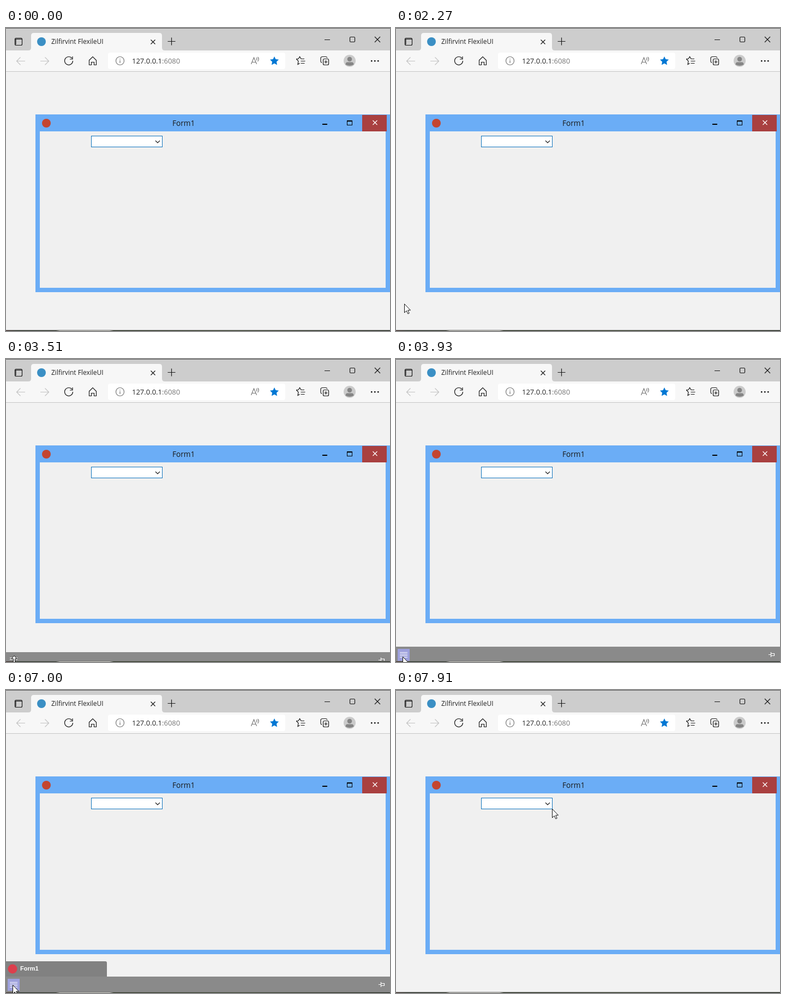
An HTML page that plays this animation: 704x554 px, repeating every 7990 ms.

```html
<!DOCTYPE html>
<html lang="en">
<head>
<meta charset="utf-8">
<title>Form list</title>
<style>
  html, body { margin: 0; width: 100%; height: 100%; overflow: hidden; background: #f2f2f2; }
  svg { display: block; width: 704px; height: 554px; font-family: "Open Sans", "Noto Sans", sans-serif; }
  .line { fill: none; stroke: #1a1a1a; stroke-width: 1.2; }
  .dim { stroke: #c3c3c3; }
  .grey { stroke: #777; }
  .white { stroke: #fff; }
</style>
</head>
<body>
<svg viewBox="0 0 704 554">
  <defs>
    <linearGradient id="desktop">
      <stop offset="0" stop-color="#4a302c"/>
      <stop offset=".03" stop-color="#253022"/>
      <stop offset=".13" stop-color="#30382b"/>
      <stop offset=".14" stop-color="#c4c4bc"/>
      <stop offset=".27" stop-color="#d0d0c8"/>
      <stop offset=".28" stop-color="#29331f"/>
      <stop offset=".6" stop-color="#3c4630"/>
      <stop offset="1" stop-color="#20281b"/>
    </linearGradient>
    <clipPath id="page"><path d="M0 80H704V552H0Z"/></clipPath>
  </defs>

  <!-- Browser title bar -->
  <path fill="#f2f2f2" d="M0 0H704V554H0Z"/>
  <path fill="#cdcdcd" d="M0 0H704V41H0Z"/>
  <path fill="#5c5c5c" d="M0 0H704V1H0Z"/>
  <path fill="#f7f7f7" d="M0 41H41Q46 41 46 36V14Q46 9 51 9H281Q286 9 286 14V36Q286 41 291 41H704V79H0Z"/>
  <path fill="#c6c6c6" d="M0 79H704V80H0Z"/>
  <rect class="line" x="16.5" y="18.5" width="13" height="13" rx="2"/>
  <path class="line" stroke-width="2.5" d="M17 20.3H29M18 20V30"/>
  <circle cx="65" cy="25" r="8" fill="#3b8fc4"/>
  <text x="83" y="29" font-size="12" fill="#222">Zilfirvint FlexileUI</text>
  <path class="line" stroke-width="1.5" d="M265.500 21.500l8 8m0-8l-8 8"/>
  <path class="line" d="M296.500 24.500h14m-7-7v14"/>
  <path class="line" d="M584 21.500h10M676 16l10 10m0-10l-10 10"/>
  <rect class="line" x="630.5" y="16.500" width="9" height="9" rx="1.5"/>

  <!-- Browser toolbar -->
  <path class="line dim" d="M35 60.500H19.500m7-7l-7 7 7 7M63 60.500H78.500m-7-7l7 7-7 7"/>
  <path class="line" stroke-width="1.4" d="M121 55.500A7.500 7.500 0 1 0 122.500 60M122 52v5h-5"/>
  <path class="line" d="M152.500 59L159 52.500 165.500 59V67.500H161.500V62.500H156.500V67.500H152.500Z"/>
  <rect x="187" y="45" width="325" height="30" rx="4" fill="#fff"/>
  <circle class="line grey" cx="209" cy="60" r="7.500"/>
  <path class="line grey" d="M209 59v5M209 56v1.500"/>
  <text x="231" y="65" font-size="13" fill="#222">127.0.0.1<tspan fill="#767676">:6080</tspan></text>
  <path class="line grey" d="M449.500 66L454.500 54 459.500 66M451 62.500h7M459 54q2 3 0 5M461.500 53q3.500 4 0 8"/>
  <path id="star" fill="#0078d4"/>
  <path class="line" d="M532 56.500h4l2.500-4 2.500 4h6M532.500 57l3.500 3.500-1 6 3.500-2M540.500 60.500h8M540.500 64.500h7"/>
  <path class="line" d="M579 63.500q-2-1-2-3v-5q0-3 3-3h6q2 0 3 2"/>
  <rect class="line" x="581.500" y="56.500" width="10" height="11" rx="2"/>
  <path class="line" d="M583.500 62h6m-3-3v6"/>
  <circle cx="630" cy="60" r="11" fill="#cbcbcb"/>
  <circle cx="630" cy="57" r="4.300" fill="#858585"/>
  <path fill="#858585" d="M622.500 67Q622.500 62.500 626 62.500H634Q637.500 62.500 637.500 67Q630 71 622.500 67Z"/>
  <path fill="#1a1a1a" d="M669 59h2.500v2.500H669ZM675 59h2.500v2.500H675ZM681 59h2.500v2.500H681Z"/>

  <!-- Application window -->
  <path fill="#6badf6" d="M54 158H704V483H54Z"/>
  <path fill="#f0f0f0" d="M62 189H696V475H62Z"/>
  <circle cx="74" cy="174" r="8" fill="#c4452f"/>
  <text x="305" y="179" font-size="13.6" fill="#1a1a1a">Form1</text>
  <path fill="#000" d="M580 175H589V177H580Z"/>
  <path fill="#000" fill-rule="evenodd" d="M625 169H635V178H625ZM626 171V177H634V171Z"/>
  <path fill="#a94040" d="M653 159H698V189H653Z"/>
  <path class="line white" stroke-width="1.6" d="M672.500 169l8 8m0-8l-8 8"/>
  <rect x="156.500" y="197.500" width="130" height="20" fill="#fff" stroke="#0f74bd"/>
  <path class="line" stroke-width="1" d="M274 206l4 4 4-4"/>

  <g id="note">
    <text x="112" y="423.500" font-size="23.7" fill="#f01c1f">The form list only has 1 item in it for the main form.</text>
    <path fill="none" stroke="#f5181b" stroke-width="3" stroke-linejoin="round"
      d="M52 494L61 464 69 469 102 431 107 436 75 471 82 478ZM73 461L68 478 88 456"/>
  </g>

  <g id="list">
    <path fill="#818181" d="M0 496H182Q185 496 185 499V524H0Z"/>
    <circle cx="12" cy="510" r="8.500" fill="#dc3f4d"/>
    <text x="26" y="513" font-size="11" font-weight="bold" fill="#fff" font-family="Liberation Sans, Arial, sans-serif">Form1</text>
  </g>

  <g clip-path="url(#page)">
    <g id="bar">
      <path fill="#8a8a8a" d="M0 0H704V28H0Z"/>
      <rect id="glow" x="3" y="4" width="22" height="22" fill="#9da0dc"/>
      <path class="line white" stroke-width="1" d="M7 10.500h14M7 13.500h14M7 16.500h14M7 19.500h14"/>
      <path class="line white" d="M683 14.500h4M687.500 10v9M688 12.500h5.500v4H688"/>
    </g>
  </g>

  <path fill="#777" d="M0 552H704V553H0Z"/>
  <path fill="url(#desktop)" d="M0 553H704V554H0Z"/>

  <g fill="#fff" stroke="#111" stroke-linejoin="round">
    <path id="arrow" d="M.5 .5V16.500L4.200 13 6.800 18.500 9.200 17.500 6.700 12H11.500Z"/>
    <path id="resize" d="M0-11.500L5-6H1.500V6H5L0 11.500-5 6H-1.500V-6H-5Z"/>
  </g>
</svg>

<script>
const LOOP = 7990;
const BAR_TOP = 524, BAR_HEIGHT = 28;
const el = id => document.getElementById(id);
const clamp = v => Math.min(1, Math.max(0, v));
const show = (id, on) => el(id).style.display = on ? "" : "none";
const place = (id, x, y) => el(id).setAttribute("transform", `translate(${x} ${y})`);

// Cursor moves: start time, shape, from x, y, then optionally to x, y, end time
const moves = [
  [650, "arrow", 643, 432, 10, 543, 1370],
  [1450, "arrow", 14, 541],
  [1530, "resize", 17, 553],
  [1700, "resize", 16, 545, 12, 516, 1940],
  [2270, "arrow", 15, 504],
  [2520, "arrow", 15, 506, 12, 540, 3190],
  [3270, "resize", 15, 554],
  [3690, "arrow", 12, 548, 12, 544, 3930],
  [4260, "arrow", 12, 539],
  [7090, "arrow", 14, 532, 20, 515, 7170],
  [7420, "arrow", 40, 490, 286, 217, 7910]
];

// Progress in equal jumps of about 80 ms
function stepped(t, start, end) {
  const count = Math.round((end - start) / 80);
  return clamp(Math.floor((t - start) / (end - start) * count + 1e-6) / count);
}

function drawCursor(t) {
  const move = moves.findLast(m => m[0] <= t);
  show("arrow", move && move[1] === "arrow");
  show("resize", move && move[1] === "resize");
  if (!move) return;
  const [start, shape, x, y, toX = x, toY = y, end = start + 80] = move;
  const p = Math.sin(stepped(t, start, end) * Math.PI / 2);
  place(shape, Math.round(x + (toX - x) * p), Math.round(y + (toY - y) * p));
}

function barOffset(t) {
  if (t < 7420) return BAR_HEIGHT * (1 - clamp((t - 2843) / 1167));
  return BAR_HEIGHT * stepped(t, 7340, 7820);
}

function draw(t) {
  place("bar", 0, Math.round(BAR_TOP + barOffset(t)));
  show("glow", t >= 3690 && t < 7090);
  show("list", t >= 4600 && t < 7170);
  el("list").style.opacity = t < 7090 ? stepped(t, 4520, 4760) : 0.5;
  show("note", t >= 4930 && t < 7000);
  drawCursor(t);
}

el("star").setAttribute("d", "M" + Array.from({ length: 10 }, (_, i) => {
  const angle = i * Math.PI / 5, r = i % 2 ? 4.2 : 8.5;
  return `${492 + r * Math.sin(angle)} ${60.5 - r * Math.cos(angle)}`;
}).join("L") + "Z");

function frame() {
  draw(performance.now() % LOOP);
  requestAnimationFrame(frame);
}
frame();
</script>
</body>
</html>
```
